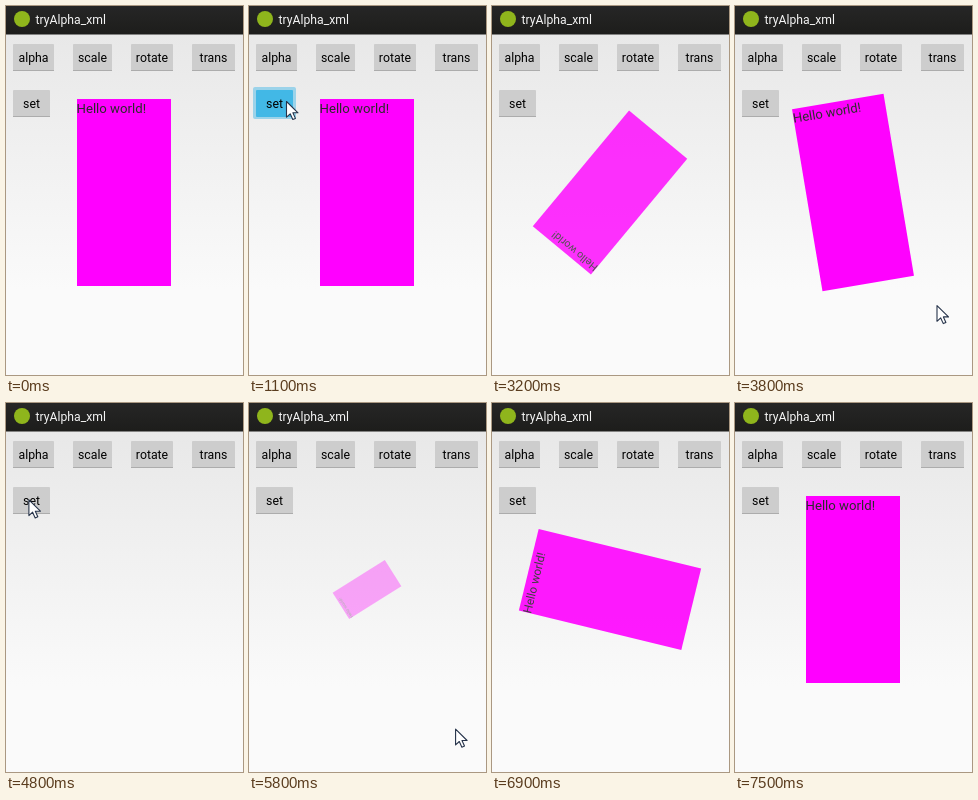
Recreate the animation shown at these times as an HTML page. Size 237 px wide and 369 px high, loop 7.9 s.

```html
<!DOCTYPE html>
<html lang="en">
<head>
<meta charset="utf-8">
<title>tryAlpha_xml</title>
<style>
  html, body { margin: 0; width: 100%; height: 100%; overflow: hidden; background: #f2f2f2; }
  svg { display: block; width: 100vw; height: 100vh; }
  text { font-family: Roboto, "Noto Sans", sans-serif; font-size: 12.3px; }
</style>
</head>
<body>
<svg id="stage" viewBox="0 0 237 369">
  <defs>
    <linearGradient id="page" x1="0" y1="0" x2="0" y2="1">
      <stop offset="0" stop-color="#e8e8e8"/>
      <stop offset="0.75" stop-color="#fafafa"/>
      <stop offset="1" stop-color="#fafafa"/>
    </linearGradient>
    <linearGradient id="bar" x1="0" y1="0" x2="0" y2="1">
      <stop offset="0" stop-color="#262626"/>
      <stop offset="1" stop-color="#1d1d1b"/>
    </linearGradient>
  </defs>
  <rect y="28" width="237" height="341" fill="url(#page)"/>
  <rect width="237" height="28.5" fill="url(#bar)"/>
  <circle cx="16" cy="13" r="8" fill="#8fb51c"/>
  <text x="29.6" y="17.6" fill="#f4f4f4" style="font-size:12.2px">tryAlpha_xml</text>
  <g id="buttons"></g>
  <g id="pressed">
    <rect x="4" y="81" width="43" height="32" rx="2" fill="#9bd3ea"/>
    <rect x="7" y="84" width="37" height="27" rx="1" fill="#42b8e6"/>
    <text x="25.5" y="102" text-anchor="middle" fill="#000">set</text>
  </g>
  <g id="card">
    <rect x="71" y="93" width="94" height="187" fill="#ff00ff"/>
    <text x="70.5" y="107" fill="#2b2b2b" style="font-size:13.2px">Hello world!</text>
  </g>
  <path id="cursor" d="M.5 .5V16.2L4.2 12.8L6.8 18.5L9.4 17.4L6.9 11.8H12Z"
        fill="#fff" stroke="#26334a" stroke-width="1.1" stroke-linejoin="round"/>
</svg>
<script>
const LOOP = 7900, STEP = 100, DURATION = 2756;
const RUN_STARTS = [1246, 4726];
const PRESSES = [[1100, 1300], [4500, 4700]];
const CENTER = [118, 186.5];

// Each trip is a list of [time, x, y]; the pointer is hidden between trips.
const TRIPS = [
  [[400, 229, 291], [1000, 37, 95], [1400, 37, 95], [2000, 220, 312], [2100, 220, 308]],
  [[3700, 212, 311], [4400, 22.4, 96.4], [4900, 22.4, 96.4], [5200, 37, 150], [5900, 216, 336]]
];

const find = id => document.getElementById(id);
const card = find("card"), pressed = find("pressed"), cursor = find("cursor");
const show = (node, on) => node.setAttribute("visibility", on ? "visible" : "hidden");

function addButton(label, x, y, width) {
  find("buttons").insertAdjacentHTML("beforeend", `
    <rect x="${x}" y="${y}" width="${width}" height="26.5" rx="1" fill="#cdcdcd"/>
    <rect x="${x}" y="${y + 26}" width="${width}" height="1" fill="#acacac"/>
    <text x="${x + width / 2}" y="${y + 18}" text-anchor="middle">${label}</text>`);
}

addButton("alpha", 7, 38, 41);
addButton("scale", 67, 38, 39);
addButton("rotate", 125, 38, 42);
addButton("trans", 186, 38, 43);
addButton("set", 7, 84, 37);

// Accelerate, then decelerate; at rest outside the runs.
function progress(time) {
  const start = RUN_STARTS.find(s => time >= s && time < s + DURATION);
  return start === undefined ? 1 : (1 - Math.cos(Math.PI * (time - start) / DURATION)) / 2;
}

function pointerAt(time) {
  const trip = TRIPS.find(t => time >= t[0][0] && time <= t[t.length - 1][0]);
  if (!trip) return null;
  const next = Math.max(1, trip.findIndex(p => p[0] >= time));
  const [t0, x0, y0] = trip[next - 1], [t1, x1, y1] = trip[next];
  const k = (time - t0) / (t1 - t0), eased = k * k * (3 - 2 * k);
  return [x0 + (x1 - x0) * eased, y0 + (y1 - y0) * eased];
}

function draw(time) {
  const amount = progress(time), [cx, cy] = CENTER;
  card.setAttribute("opacity", amount);
  card.setAttribute("transform",
    `translate(${cx} ${cy}) rotate(${720 * amount}) scale(${amount}) translate(${-cx} ${-cy})`);
  show(pressed, PRESSES.some(([from, to]) => time >= from && time < to));
  const point = pointerAt(time);
  show(cursor, point);
  if (point) cursor.setAttribute("transform", `translate(${point})`);
}

const origin = performance.now();
function tick() {
  const elapsed = (performance.now() - origin) % LOOP;
  draw(Math.floor(elapsed / STEP) * STEP);
  requestAnimationFrame(tick);
}
tick();
</script>
</body>
</html>
```
